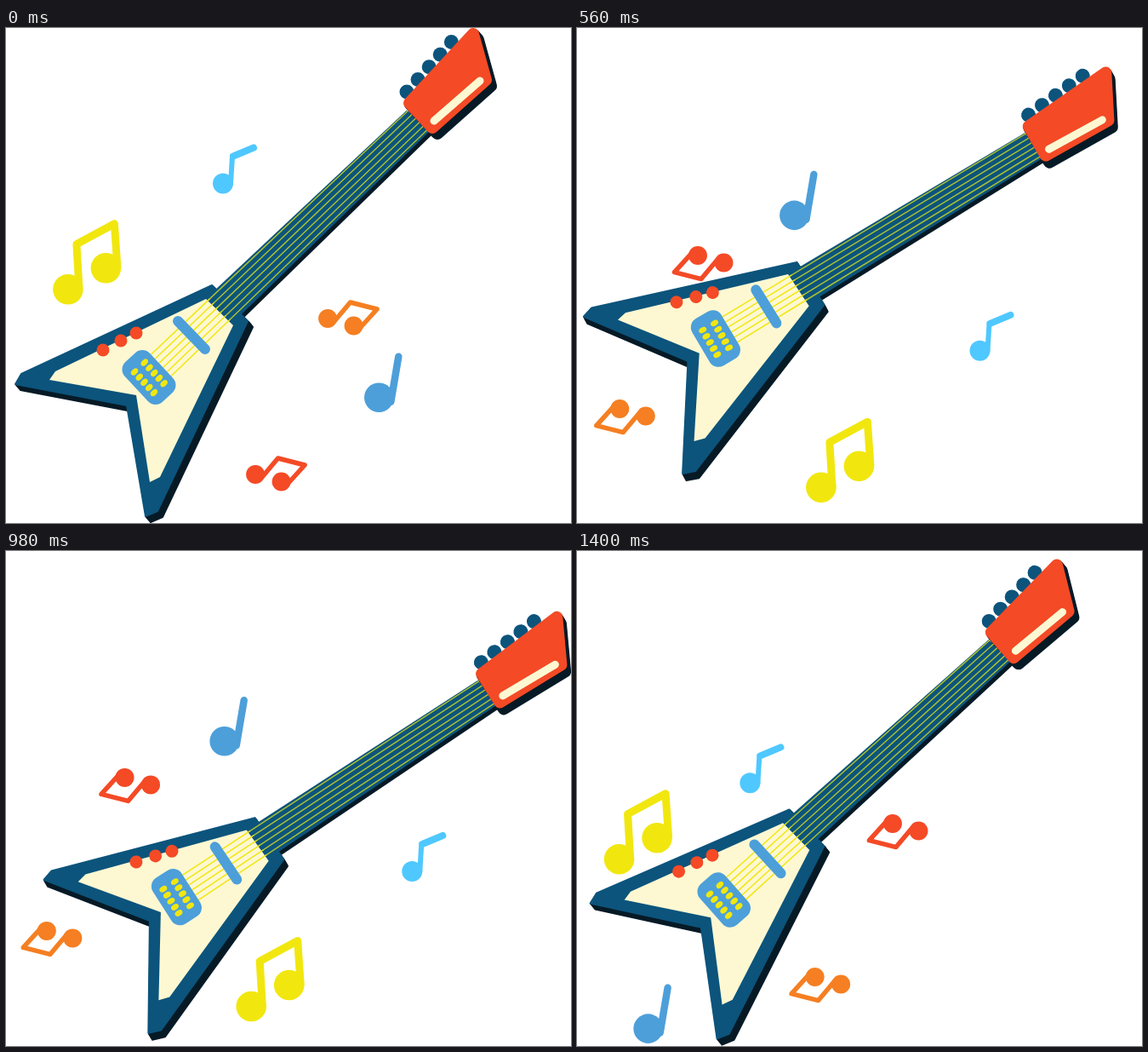
Write an HTML page with a canvas that moves like this. It is 664x581 px and loops after 1470 ms.

```html
<!DOCTYPE html>
<html lang="en">
<head>
<meta charset="utf-8">
<title>Guitar and notes</title>
<style>
  html, body { margin: 0; width: 100%; height: 100%; overflow: hidden; background: #fff; }
  canvas { display: block; }
</style>
</head>
<body>
<canvas id="stage" width="664" height="581"></canvas>
<script>
const ctx = document.getElementById('stage').getContext('2d');
const STEP = 70, STEPS = 21, SCENE = 7;
const NAVY = '#0c547c', DARK = '#061a26', CREAM = '#fdf8d2', RED = '#f44a26',
      BLUE = '#4d9fd9', SKY = '#4fc8ff', YELLOW = '#f1e70f', ORANGE = '#f57f22';

const mix = (a, b, k) => a.map((v, i) => v + (b[i] - v) * k);
const radians = degrees => degrees * Math.PI / 180;

function trace(points) {
  ctx.beginPath();
  for (const [x, y] of points) ctx.lineTo(x, y);
}

function shape(points, color, round = 0) {
  trace(points);
  ctx.closePath();
  ctx.fillStyle = ctx.strokeStyle = color;
  ctx.fill();
  if (round) {
    ctx.lineWidth = round * 2;
    ctx.stroke();
  }
}

function line(points, color, width) {
  trace(points);
  ctx.strokeStyle = color;
  ctx.lineWidth = width;
  ctx.stroke();
}

function oval(x, y, rx, ry, color, angle = 0) {
  ctx.beginPath();
  ctx.ellipse(x, y, rx, ry, angle, 0, Math.PI * 2);
  ctx.fillStyle = color;
  ctx.fill();
}

const dot = (x, y, r, color) => oval(x, y, r, r, color);

// Draws a dark solid reaching from the shape towards the lower right
function extrude(points, round, dx, dy) {
  for (let i = 1; i <= dy; i++) {
    const shift = ([x, y]) => [x + dx * i / dy, y + i];
    shape(points.map(shift), DARK, round);
  }
}

const BODY = [[242, 302], [284, 344], [178, 567], [164, 573], [142, 443], [11, 418], [18, 406]];
const FACE = [[235, 318], [267, 349], [181, 527], [169, 533], [153, 431], [51, 413], [58, 403]];
const NECK = [[236, 316.5], [471, 96.5], [497, 122], [266, 346.5]];
const HEAD = [[474, 88], [549, 7], [564, 61], [501, 117]];

// Poses at the scene borders: first knob's x and y, then degrees
const REST = [114, 378, 0];
const POSES = [REST, [111, 314.5, 12.7], [153, 365, 10.3], REST];

function drawStrings() {
  for (let i = 0; i < 6; i++) {
    const bridge = [166 + i * 4.8, 387.5 + i * 5];
    const nut = [472 + i * 4.5, 97.5 + i * 4.5];
    const joint = mix(bridge, nut, 0.24);
    line([bridge, joint], YELLOW, 1.5);
    line([joint, nut], '#a9bf35', 1.5);
  }
}

function drawPickup() {
  ctx.save();
  ctx.translate(168, 410);
  ctx.rotate(radians(47));
  shape([[-20, -8], [20, -8], [20, 8], [-20, 8]], BLUE, 12);
  for (let i = 0; i < 10; i++) {
    const along = (i % 5 - 2) * 8.4, across = i < 5 ? -8 : 8;
    oval(along + 0.5, across, 3.2, 4.8, YELLOW);
  }
  ctx.restore();
}

function drawGuitar(step) {
  const leg = Math.floor(step / SCENE);
  const [x, y, angle] = mix(POSES[leg], POSES[leg + 1], step % SCENE / SCENE);
  ctx.save();
  ctx.translate(x, y);
  ctx.rotate(radians(angle));
  ctx.translate(-REST[0], -REST[1]);
  extrude(BODY, 1, 6, 7);
  extrude(HEAD, 7, 6, 7);
  extrude(NECK, 0, 3, 4);
  shape(BODY, NAVY, 1);
  shape(FACE, CREAM);
  shape(NECK, NAVY);
  drawStrings();
  drawPickup();
  line([[202, 344], [234, 377]], BLUE, 12);
  for (const [kx, ky] of [[114, 378], [135, 367], [153, 358]]) dot(kx, ky, 7.5, RED);
  for (let i = 0; i < 5; i++) dot(471 + i * 13.1, 75 - i * 14.6, 8.5, NAVY);
  shape(HEAD, RED, 7);
  line([[503, 109], [557, 62]], CREAM, 9);
  ctx.restore();
}

// Each note is drawn around the centre of its first head
function flagNote() {
  dot(0, 0, 12, SKY);
  line([[9, 0], [11, -32]], SKY, 6);
  line([[12, -32], [36, -42]], SKY, 8);
}

function bigPair() {
  dot(0, 0, 17.8, YELLOW);
  dot(44.5, -25, 17.8, YELLOW);
  line([[13, -2], [10, -53], [54.5, -77], [58, -26]], YELLOW, 9);
}

function stemNote() {
  dot(0, 0, 17.3, BLUE);
  line([[14, 5], [23, -48]], BLUE, 8.5);
}

function smallPair(color) {
  dot(0, 0, 11, color);
  dot(30.5, 8.5, 11, color);
  line([[8, 3], [26.5, -19], [58, -11], [38, 11]], color, 5.5);
}

// One home per scene; swaying notes reverse their drift from scene to scene
const NOTES = [
  { draw: flagNote, drift: [2, -1.5], sways: true,
    homes: [[253, 184], [475.3, 377.5], [205.2, 271]] },
  { draw: bigPair, drift: [0.7, -2.5], sways: true,
    homes: [[72.2, 309.3], [287.5, 537], [50.2, 359.5]] },
  { draw: stemNote, drift: [-0.7, -1.8],
    homes: [[439, 435.5], [256, 221.5], [83, 559]] },
  { draw: () => smallPair(ORANGE), drift: [1.3, 0.6], flips: true,
    homes: [[376.8, 340.4], [79.6, 455], [311.3, 509.1]] },
  { draw: () => smallPair(RED), drift: [1.3, 0.6], flips: true,
    homes: [[291.8, 523.4], [171.3, 275], [402.6, 329.1]] }
];

function drawNotes(step) {
  const scene = Math.max(0, Math.ceil(step / SCENE) - 1);
  for (const { draw, drift, homes, sways, flips } of NOTES) {
    const phase = step / SCENE - (sways ? 0 : scene);
    const wave = Math.cos(Math.PI * phase);
    const [x, y] = homes[scene];
    ctx.save();
    ctx.translate(x + drift[0] * wave, y + drift[1] * wave);
    if (flips && scene > 0) ctx.rotate(Math.PI);
    draw();
    ctx.restore();
  }
}

function render(now) {
  const step = Math.floor(now / STEP) % STEPS;
  ctx.fillStyle = '#fff';
  ctx.fillRect(0, 0, 664, 581);
  ctx.lineCap = ctx.lineJoin = 'round';
  drawGuitar(step);
  drawNotes(step);
}

const start = performance.now();
function tick() {
  render(performance.now() - start);
  requestAnimationFrame(tick);
}
tick();
</script>
</body>
</html>
```
